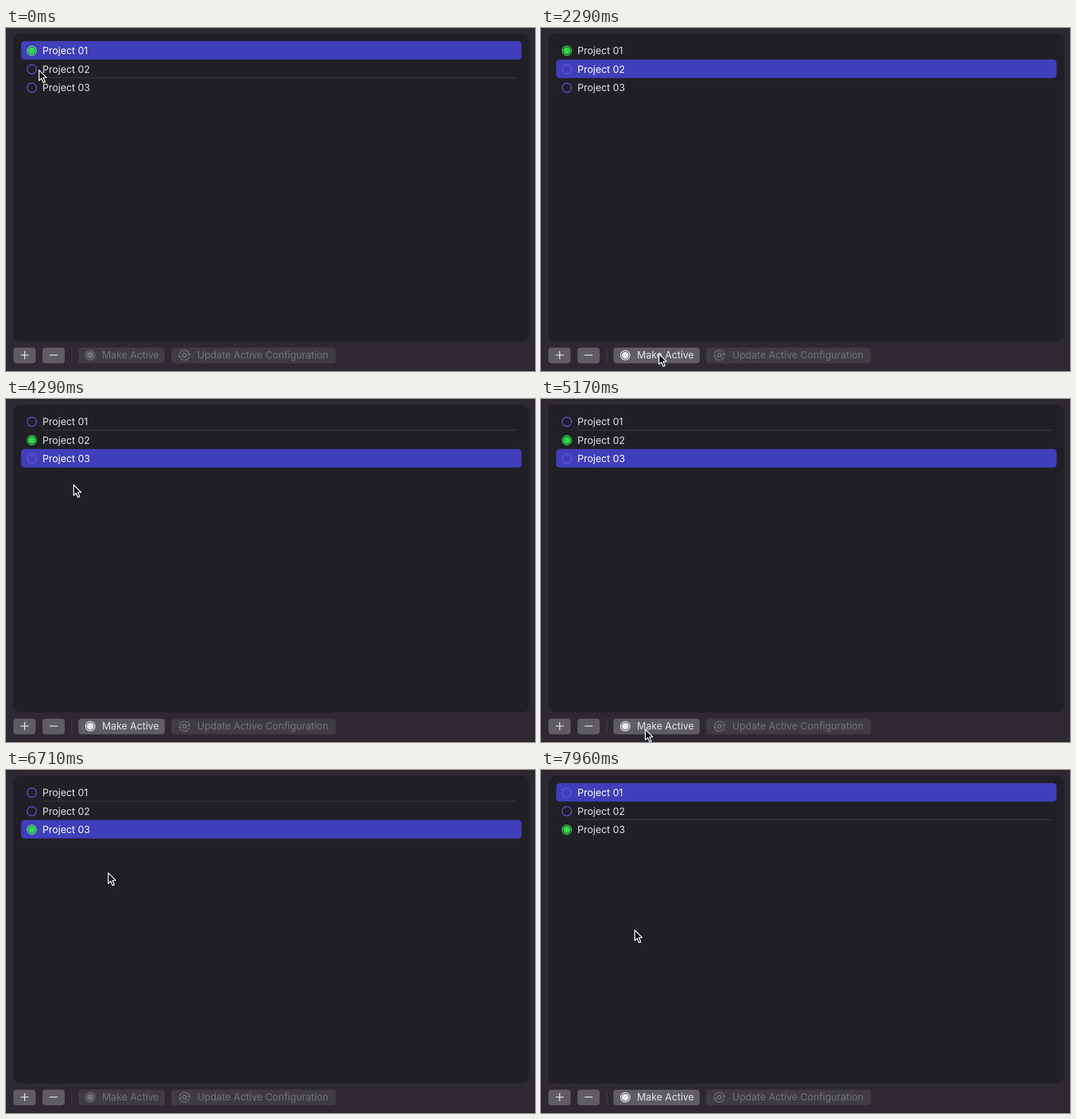
Write an HTML page that moves like this. It is 928 by 603 pixels and loops after 8 s.

```html
<!DOCTYPE html>
<html lang="en">
<head>
<meta charset="utf-8">
<title>Project list</title>
<style>
  html, body { margin: 0; width: 100%; height: 100%; overflow: hidden; background: #2d2831; }
  svg { display: block; width: 100%; height: 100%; }
  text { font: 400 17.2px Inter, Roboto, sans-serif; fill: #e6e5e8; }
  .line { stroke: #45424a; stroke-width: 1; }
  .btn { fill: #5f5c64; }
  .glyph { stroke: #eceaee; stroke-width: 1.6; stroke-linecap: round; }
  .off .btn { fill: #3f3b43; }
  .off text { fill: #747178; }
  .off { color: #747178; }
  .on { color: #e8e7ea; }
  .pressed .btn { fill: #7a777f; }
  .icon { fill: none; stroke: currentColor; stroke-width: 1.5; }
</style>
</head>
<body>
<svg viewBox="0 0 928 603" xmlns="http://www.w3.org/2000/svg">
  <rect width="928" height="603" fill="#2d2831"/>
  <rect y="602" width="928" height="1" fill="#211d26"/>
  <rect x="13" y="10" width="904.5" height="541" rx="12" fill="#211f26"/>
  <rect id="selection" x="26.5" width="878" height="32.5" rx="6" fill="#403eba"/>
  <line id="divider" class="line" x1="64.5" x2="896"/>
  <g id="rows"></g>

  <rect class="btn" x="13" y="562" width="39" height="27.5" rx="5"/>
  <path class="glyph" d="M26.2 575H39.2M32.7 568.5V581.5"/>
  <rect class="btn" x="64" y="562" width="39" height="27.5" rx="5"/>
  <path class="glyph" d="M77 575H90"/>
  <line class="line" x1="115.5" x2="115.5" y1="563" y2="589"/>

  <g id="activate">
    <rect class="btn" x="127" y="562" width="151.5" height="27.5" rx="5"/>
    <circle class="icon" cx="147.8" cy="575.3" r="8.2"/>
    <circle cx="147.8" cy="575.3" r="6.1" fill="currentColor"/>
    <text x="168.5" y="581.4">Make Active</text>
  </g>
  <g class="off">
    <rect class="btn" x="290" y="562" width="288.5" height="27.5" rx="5"/>
    <g class="icon" transform="translate(313 575.3)">
      <path d="M-8.3 -2.2A8.6 8.6 0 0 1 8.3 -2.2M8.3 2.2A8.6 8.6 0 0 1 -8.3 2.2"/>
      <path d="M5.8 -2.6H10.8L8.6 1ZM-5.8 2.6H-10.8L-8.6 -1Z" fill="currentColor" stroke="none"/>
      <circle r="2.9"/>
      <circle r="4.3" stroke-dasharray="1.7 1.68"/>
    </g>
    <text x="335.5" y="581.4">Update Active Configuration</text>
  </g>

  <path id="cursor" d="M1 2V20.5L5.3 16.6L8.6 24L11.6 22.7L8.4 15.3L14 15Z"
        fill="#121014" stroke="#fff" stroke-width="1.6" stroke-linejoin="round"/>
</svg>
<script>
const LOOP = 8000, PITCH = 32.5;
const $ = id => document.getElementById(id);
const set = (el, attrs) => { for (const k in attrs) el.setAttribute(k, attrs[k]); };

// Pointer moves: start, end, x, y
const home = [57, 72];
const moves = [
  [130, 210, 59, 73], [560, 790, 102, 73], [960, 1210, 103, 74],
  [1580, 2290, 206, 571], [2840, 3670, 126, 115], [3680, 3900, 110, 98],
  [4250, 5000, 182, 578], [5090, 5170, 182, 579], [5290, 5420, 183, 576],
  [6290, 7130, 177, 56], [7130, 7340, 174, 32], [7480, 7960, 163.5, 279.5]
];

// Hard changes: time, value
const selected = [[0, 0], [1040, 1], [3960, 2], [7380, 0]];
const active = [[0, 0], [2630, 1], [6130, 2]];
const enabled = [[0, false], [1040, true], [6130, false], [7380, true]];
const pressed = [[0, false], [2460, true], [2630, false], [5880, true], [6130, false]];

const at = (steps, t) => steps.filter(s => s[0] <= t).pop()[1];

// Quick start, soft landing
function ease(p) {
  const q = Math.pow(p, 0.55);
  return q * q * (3 - 2 * q);
}

function pointer(t) {
  let [x, y] = home;
  for (const [start, end, toX, toY] of moves) {
    if (t <= start) break;
    const k = ease(Math.min(1, (t - start) / (end - start)));
    x += (toX - x) * k;
    y += (toY - y) * k;
  }
  return [x, y];
}

$('rows').innerHTML = [0, 1, 2].map(i => `
  <g transform="translate(0 ${40 + i * PITCH})">
    <circle cx="45.3" r="8.1" fill="none" stroke-width="1.6"/>
    <circle cx="45.3" r="6.2" fill="#32d74b"/>
    <text x="64" y="6.2">Project 0${i + 1}</text>
  </g>`).join('');
const rows = [...$('rows').children];

function draw(t) {
  const sel = at(selected, t), act = at(active, t);
  set($('selection'), { y: 23 + sel * PITCH });
  const lineY = sel === 0 ? 87.3 : 54.8;
  set($('divider'), { y1: lineY, y2: lineY, visibility: sel === 1 ? 'hidden' : 'visible' });
  rows.forEach((row, i) => {
    const [ring, dot] = row.children;
    set(ring, { stroke: i === act ? (i === sel ? '#5ce178' : '#32d74b') : '#5f56dc' });
    set(dot, { visibility: i === act ? 'visible' : 'hidden' });
    set(row.lastElementChild, { style: i === sel ? 'fill:#fff' : '' });
  });
  set($('activate'), { class: (at(enabled, t) ? 'on' : 'off') + (at(pressed, t) ? ' pressed' : '') });
  const [x, y] = pointer(t);
  set($('cursor'), { transform: `translate(${x.toFixed(2)} ${y.toFixed(2)})` });
}

const begin = performance.now();
function tick() {
  draw((performance.now() - begin) % LOOP);
  requestAnimationFrame(tick);
}
tick();
</script>
</body>
</html>
```
